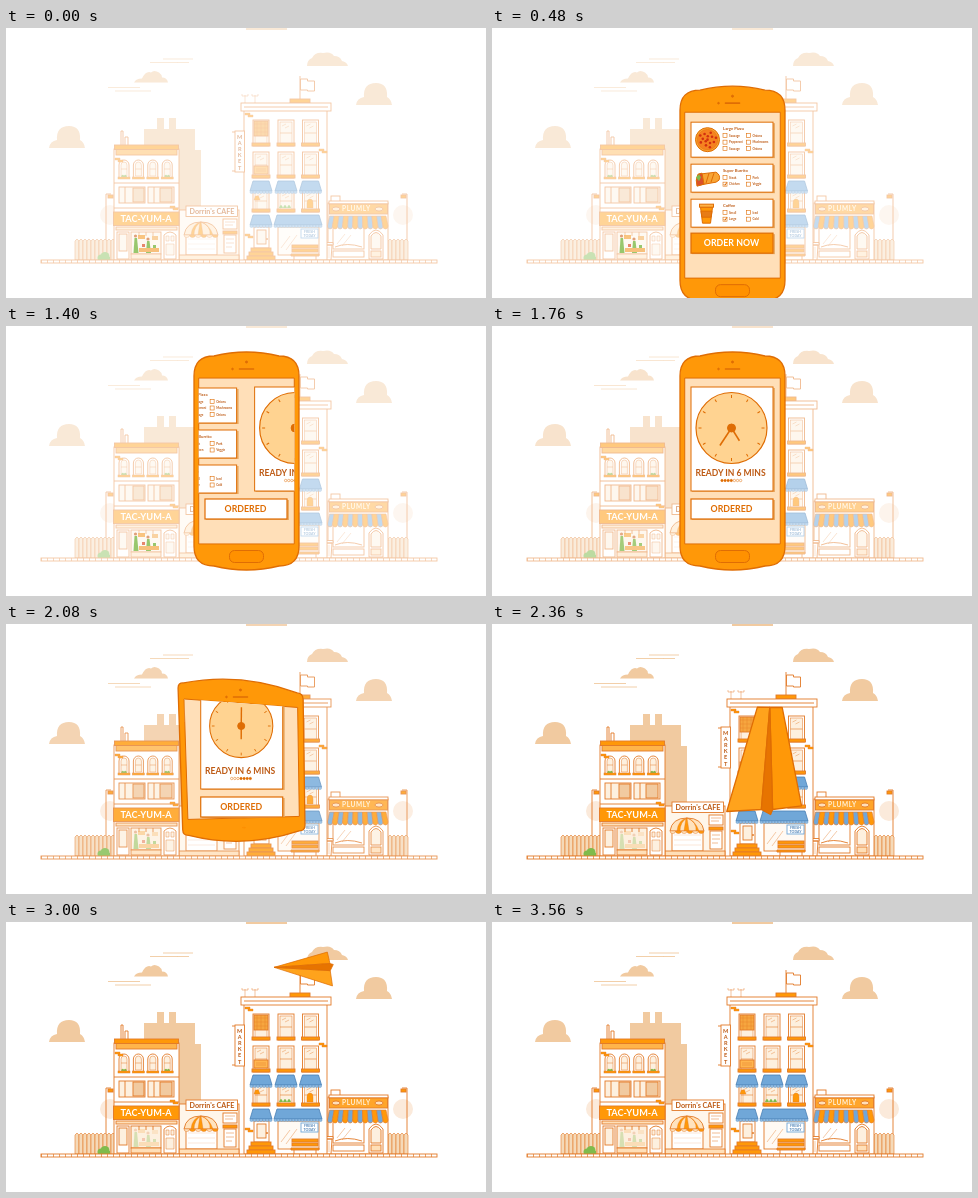
Animation of 480 by 270 pixels, one loop 3600 ms. Source, as an HTML page:

```html
<!DOCTYPE html>
<html lang="en">
<head>
<meta charset="utf-8">
<title>Order ahead</title>
<style>
  html, body { margin: 0; width: 100%; height: 100%; overflow: hidden; background: #fff; }
  svg { display: block; width: 100%; height: 100%; }
  text { font-family: Lato, sans-serif; font-weight: 700; stroke: none; }
</style>
</head>
<body>
<svg id="stage" viewBox="0 0 480 270"></svg>
<script>
const ORANGE = '#ff9808', LINE = '#e27a28', DEEP = '#df6d04', TAN = '#f1caa0', CREAM = '#fdf0df',
  PALE = '#ffdfb8', BLUE = '#70a7d8', NAVY = '#4b80b5', GREEN = '#7fbb4c', INK = '#bd5a14';
const LOOP = 3600;

// ---------- markup helpers ----------
const rect = (x, y, w, h, fill = '#fff', extra = '') =>
  `<rect x="${x}" y="${y}" width="${w}" height="${h}" fill="${fill}" ${extra}/>`;
const path = (d, fill = 'none', extra = '') => `<path d="${d}" fill="${fill}" ${extra}/>`;
const circle = (x, y, r, fill = '#fff', extra = '') =>
  `<circle cx="${x}" cy="${y}" r="${r}" fill="${fill}" ${extra}/>`;
const label = (x, y, size, str, fill = DEEP, extra = 'text-anchor="middle"') =>
  `<text x="${x}" y="${y}" font-size="${size}" fill="${fill}" ${extra}>${str}</text>`;
const group = (inner, attrs = '') => `<g ${attrs}>${inner}</g>`;
const times = (n, fn) => Array.from({ length: n }, (_, i) => fn(i)).join('');
const NOLINE = 'stroke="none"', THIN = 'stroke-width=".4"', HEAVY = 'text-anchor="middle" font-weight="900"';

// ---------- town ----------
const cloud = (x, y, d) => path(d, TAN, `${NOLINE} transform="translate(${x} ${y})"`);
const PUFF = 'M0 22q1-7 8-8q-1-14 12-14q12 0 11 14q4 2 5 8z';

// striped shop awning with a scalloped hem
function awning(x, y, w, h, n, colors) {
  const step = w / n, slant = 2;
  return group(times(n, i => {
    const a = x + i * step, top = j => x + slant + j * (w - 2 * slant) / n;
    return path(`M${top(i)} ${y}H${top(i + 1)}L${a + step} ${y + h - 3}a${step / 2} 3 0 0 1 ${-step} 0Z`,
      colors[i % colors.length]);
  }), 'stroke-width=".6"');
}

// plain window canopy with a narrow valance
function canopy(x, y, w) {
  const n = Math.round(w / 3), step = w / n;
  return group(path(`M${x + 3} ${y}h${w - 6}l3 10h${-w}z`, BLUE) +
    times(n, i => path(`M${x + i * step} ${y + 10}h${step}v1.500a${step / 2} 1 0 0 1 ${-step} 0z`, '#8fbce4', 'stroke-width=".35"')),
    `stroke="${NAVY}" stroke-width=".8"`);
}

function sash(x, y, w, h) {
  return rect(x, y, w, h) + rect(x + 2, y + 2, w - 4, h - 3, CREAM, 'stroke-width=".5"') +
    path(`M${x + 2} ${y + h / 2}h${w - 4}`, 'none', 'stroke-width=".6"') +
    path(`M${x + 4} ${y + 6}l4 -2m-1 4l4 -2`, 'none', THIN) + rect(x - 1, y + h - 3, w + 2, 3, ORANGE);
}

const fence = (x, n) => times(n, i => path(`M${x + i * 4} 232v-19l2-2l2 2v19z`, '#f5d9b8', 'stroke-width=".6"'));

const lamp = (x, side) => circle(x, 187, 10, '#fbeadb', NOLINE) +
  path(`M${x + side * 4} 232V166h${-side * 5}`) + rect(x - 2, 167, 5, 3, ORANGE);

const bricks = (x, y) => path(`M${x} ${y}h5v2h-5zm3 2h5v2h-5z`, ORANGE, THIN);

function skyline() {
  return cloud(43, 98, PUFF) + cloud(350, 55, PUFF) +
    cloud(128, 43, 'M0 11.500q2-4 8-4q4-8 9-6q3-3 8 0q3 2 3 5q5 0 6 5z') +
    cloud(301, 24, 'M0 14q0-6 5-8q3-6 11-5q8-2 11 3q6 0 8 5q5 1 6 5z') +
    rect(240, 0, 41, 2, TAN, NOLINE) +
    path('M157 31h30M144 34.500h28M171 34.500h12M102 59.500h32M109 63h36', 'none', `stroke="${TAN}"`) +
    path('M138 190V101h13V90h7v11h5V90h7v11h19v21h6v68z', TAN, NOLINE);
}

function wrapShop() {
  return path('M115 118v-15h2v15M119 118v-9h3v9') + rect(108, 121, 65, 111) +
    rect(110, 121, 61, 6, '#ffb44a') + rect(108.500, 117, 64, 4.500, ORANGE) +
    times(4, i => {
      const x = 113 + i * 14.4;
      return path(`M${x} 150v-13a5 5 0 0 1 10 0v13z`, '#fff') +
        path(`M${x + 2} 148v-11a3 3 0 0 1 6 0v11zm0-7h6`, CREAM, 'stroke-width=".5"') +
        (i % 3 ? '' : path(`M${x + 2} 149q1.500-4 3-1q1.500-3 3 1z`, GREEN, NOLINE)) + rect(x - 1, 149, 12, 2, ORANGE, 'stroke-width=".5"');
    }) + path('M108 155h65M108 180h65') +
    rect(113, 159, 26, 16, CREAM) + rect(142, 159, 26, 16, CREAM) + rect(127, 160, 11, 14, TAN) + rect(154, 160, 12, 14, TAN) +
    path('M119 159v16M148 159v16') + bricks(109, 130) + bricks(164, 178) +
    rect(107.500, 184, 65.500, 13.500, ORANGE) + label(140, 194, 9.2, 'TAC-YUM-A', '#fff', HEAVY) +
    rect(110, 199, 61, 3, PALE) + rect(111, 204, 12, 27) + rect(113, 206, 8, 17, CREAM) +
    rect(125, 204, 30, 22, CREAM) + path('M133 204v4m7-4v4m7-4v4') +
    rect(125, 226, 30, 5, PALE) + path('M158 231v-24q6-6 12 0v24z', '#fff') +
    path('M160 216h8v11h-8zM160 213v-5h3v5zm5 0v-5h3v5z', CREAM, 'stroke-width=".5"');
}

function cafe() {
  return rect(173, 182, 60, 50, '#fff6ea') + rect(180, 178, 51.500, 10.500) +
    label(206, 186, 7.2, "Dorrin's CAFE", INK, HEAVY) + rect(180, 206, 31, 21) +
    path('M182 211h27m-27 5h27m-27 5h27', 'none', 'stroke-width=".3" opacity=".6"') +
    path('M178 207q2-13 17-13t17 13z', '#ffe3be') +
    path('M185 207q1-11 10-13q-7 4-7 13zM192 207l2-13h1l2 13zM204 207q1-9-9-13q8 2 12 13z', ORANGE, THIN) +
    times(6, i => path(`M${178 + i * 5.67} 207a2.83 2.500 0 0 0 5.67 0z`, i % 2 ? ORANGE : '#ffe3be', 'stroke-width=".5"')) +
    rect(217, 191, 14, 10) + path('M219 194h10m-10 3h8', 'none', 'stroke-width=".5"') +
    rect(217, 203, 14, 3, ORANGE) + rect(218, 207, 12, 18) + path('M220 211h8m-8 4h8m-8 4h6', 'none', 'stroke-width=".5"') +
    rect(173, 227, 60, 5, PALE);
}

function market() {
  const cols = [247, 272, 296.5];
  const antenna = x => path(`M${x} 75v-8m-3-1v2h6v-2`, 'none', 'opacity=".5"');
  return antenna(239) + antenna(249) + path('M294 71V48') + path('M294.500 51h7v2h7v10h-7v-1h-7z', '#fff') +
    rect(284, 71, 20, 4, ORANGE) + rect(238, 82, 83, 150) + rect(235, 75, 90, 8) + path('M238 79h84') +
    cols.map(x => sash(x, 92, 16, 26) + sash(x, 124, 16, 26) + sash(x, 162, 16, 22) + canopy(x - 3, 153, 22)).join('') +
    rect(248, 93, 14, 15, '#f6a63f') + path('M248 96h14m-14 4h14m-14 4h14m-11-11v15m4-15v15m4-15v15', 'none', THIN) +
    rect(248, 138, 14, 8, '#ffb64f') + path('M250 141h10m-10 2h10', 'none', 'stroke-width=".5"') +
    path('M251 181v-9m-3 0h6l-1.500-4h-3z', ORANGE, THIN) +
    path('M273 180q2-6 4 0q2-6 4 0q2-6 4 0', GREEN, NOLINE) +
    path('M301 180v-5a3 4 0 0 1 6 0v5z', ORANGE, THIN) +
    rect(248, 199, 15, 21) + rect(251, 202, 9, 14, CREAM) + circle(261, 211, .6, DEEP) +
    rect(245, 220, 20, 4, ORANGE) + rect(243, 224, 24, 4, ORANGE) + rect(241, 228, 28, 4, ORANGE) +
    rect(272, 199, 41, 28, '#fffaf4') + path('M275 220l9-12m-4 14l11-15', 'none', THIN) +
    rect(295, 201, 17, 9, '#fff', `stroke="${BLUE}"`) + label(303.5, 205, 3.5, 'FRESH', NAVY) + label(303.5, 208.8, 3.5, 'TODAY', NAVY) +
    canopy(244, 187, 22) + canopy(268, 187, 48) +
    bricks(239, 85) + bricks(313, 121) + bricks(239, 206) +
    rect(229, 103, 9.5, 41) + [...'MARKET'].map((c, i) => label(233.7, 110.5 + i * 6.2, 5.6, c, INK, HEAVY)).join('') +
    path('M226 104h3m-3 39h3') +
    rect(286, 217, 26, 3, ORANGE) + rect(286, 221, 26, 3, ORANGE) + path('M285 226h28v2h-28zm3 2v4m22-4v4', ORANGE);
}

function cornerShop() {
  const oval = x => `<ellipse cx="${x}" cy="181" rx="4" ry="2" fill="${PALE}"/>`;
  return rect(325, 168, 9, 6) + rect(322, 175, 60, 57) + rect(323, 173, 59, 3) + rect(323.5, 176, 58, 10, '#ffa52a') +
    label(350.5, 183, 6.5, 'PLUMLY', '#fff0d8', 'text-anchor="middle" letter-spacing=".6"') + oval(330) + oval(373) +
    rect(327, 198, 31, 23) + path('M331 216l8-10m-3 12l9-11', 'none', THIN) + path('M329 219q12-5 27 0') +
    path('M363 231v-24q7-10 14 0v24z', '#fff') + path('M365 221v-13q5-7 10 0v13z', CREAM) + rect(365, 223, 10, 6, PALE) +
    awning(321.5, 188, 60.5, 13, 12, [BLUE, ORANGE]) + rect(327, 223, 31, 6) +
    path('M316 217h10l-1 15h-8zM315 214.500h12v2.500h-12z', '#fff') + path('M319 219v11m2-11v11m2-11v11', 'none', THIN);
}

const bush = circle(95, 230, 3.5, GREEN) + circle(99, 228.5, 4.5, GREEN) + rect(92, 229, 12, 4, GREEN);
const town = skyline() + lamp(104, -1) + lamp(397, 1) + fence(69, 10) + fence(382, 5) + group(bush, NOLINE) +
  cafe() + wrapShop() + cornerShop() + market() +
  rect(35, 232, 396, 3) + path('M35 233.500H431', 'none', 'stroke-width="3" stroke-dasharray=".7 5.300"');

const person = (x, y) => circle(x, y, 1.6, '#d98a5a') + path(`M${x - 2} 225l1-${223 - y}h2.500l1.500 ${223 - y}z`, GREEN);
const staff = person(129.5, 208) + person(142, 211) + rect(132, 207, 7, 4, '#f8b763') + rect(146, 208, 6, 4, '#f8c88c') +
  rect(133, 220, 20, 4, '#f6b25d') + rect(136, 216, 3, 3, '#e26a4a') + rect(147, 217, 3, 3, GREEN);

// ---------- phone ----------
const option = (x, y, name, on) => rect(x, y, 4, 4, '#fff', 'stroke-width=".6"') +
  (on ? path(`M${x + .7} ${y + 2}l1.200 1.200l2-3`) : '') + label(x + 6, y + 3.2, 3, name, INK, '');

const shadowed = (x, y, w, h, fill, extra) => rect(x + 1, y + 1, w + 1, h, '#e9ad68', NOLINE) + rect(x, y, w, h, fill, extra);

function card(y, h, title, names, checked, picture) {
  return shadowed(199, y, 82, h) + label(231, y + 8, 4.2, title, INK, '') +
    names.map((n, i) => option(i % 2 ? 254.5 : 231, y + 11.5 + (i >> 1) * 6.5, n, i === checked)).join('') + picture;
}

const pizza = circle(215.5, 79.5, 12, '#f8a434') + circle(215.5, 79.5, 10.3, '#f58220', 'stroke-width=".4"') +
  times(14, i => {
    const a = i * 2.4, r = 2.4 * Math.sqrt(i);
    return circle(215.5 + r * Math.cos(a), 79.5 + r * Math.sin(a), 1.3, '#d2300f', NOLINE);
  });
const burrito = path('M207 114l17-2q5 3 3 8l-3 2l-17 3q-4-6 0-11z', '#f8a434') + path('M210 113l2 11l-7 2q-2-6 1-12z', '#d9502a') +
  path('M204 117l3-3l2 3l-2 4z', GREEN, NOLINE) + path('M217 113l-3 10m8-10l-3 9');
const cup = path('M208.500 147h12l-2 16h-8z', ORANGE) + rect(207.5, 144, 14, 3, '#ffb347') + path('M209 151h11l-1 6h-9z', '#e77c16');

const list = card(62, 35, 'Large Pizza', ['Sausage', 'Onions', 'Pepperoni', 'Mushrooms', 'Sausage', 'Onions'], -1, pizza) +
  card(104, 28, 'Super Burrito', ['Steak', 'Pork', 'Chicken', 'Veggie'], 2, burrito) +
  card(139, 28, 'Coffee', ['Small', 'Iced', 'Large', 'Cold'], 2, cup);

const clock = circle(0, 0, 35.5, '#ffd391', 'stroke-width="1.2"') +
  times(12, i => path('M0-33v3', 'none', `transform="rotate(${i * 30})"`)) +
  path('M0 0V-15', 'none', 'id="hour" stroke-width="1.600"') + path('M0 0V-21', 'none', 'id="minute" stroke-width="1.600"') +
  circle(0, 0, 4, DEEP);

const ready = shadowed(199, 61, 82, 104) + group(clock, 'id="clock"') + label(238.5, 150, 8.6, 'READY IN 6 MINS', INK) +
  group(times(7, i => circle(230 + i * 3.1, 154.5, 1.2, DEEP, 'stroke-width=".5"')), 'id="dots"');

const button = shadowed(199, 173, 82, 20, ORANGE, 'id="buttonFace" stroke-width="1.200"') +
  label(239.5, 186.2, 8.8, 'ORDER NOW', '#fff', 'id="buttonText" text-anchor="middle"');

const el = new Proxy({}, { get: (_, id) => document.getElementById(id) });
el.stage.innerHTML = `<defs><clipPath id="clip"><path id="clipShape"/></clipPath></defs>` +
  group(town, `id="town" stroke="${LINE}" stroke-width=".9"`) + group(staff, `id="staff" ${NOLINE}`) +
  group(path('', ORANGE, 'id="body" stroke-width="1.300"') + path('', PALE, 'id="screen"') +
    group(group(group(list, 'id="list"') + group(ready, 'id="ready"') + button, 'id="content"'), 'clip-path="url(#clip)"') +
    group(circle(0, 10, 1, DEEP) + path('M-7 17h14', 'none', 'stroke-width="1.600" stroke-linecap="round"') + circle(-14, 17, .8, DEEP), 'id="top"') +
    rect(-17, -6, 34, 12, '#ff9100', 'rx="5" id="home"'), `id="phone" stroke="${DEEP}"`) +
  group(path('', '#ffa31c', 'id="leftWing"') + path('', ORANGE, 'id="rightWing"') + path('', '#e77400', 'id="keel"'),
    `id="plane" stroke="${DEEP}" stroke-linejoin="round"`);

// ---------- motion ----------
const progress = (t, a, b) => Math.min(1, Math.max(0, (t - a) / (b - a)));
const smooth = p => p * p * (3 - 2 * p);
const mix = (a, b, u) => a.map((v, i) => v + (b[i] - v) * u);
const toward = (a, b, dist) => mix(a, b, dist / Math.hypot(b[0] - a[0], b[1] - a[1]));
const poly = (...pts) => ({ d: `M${pts.join('L')}Z` });
const set = (node, attrs) => Object.entries(attrs).forEach(([k, v]) => node.setAttribute(k, v));

// Catmull-Rom through rows of [time, ...values]
function track(keys, t) {
  const last = keys.length - 1;
  let i = 0;
  while (i < last - 1 && t >= keys[i + 1][0]) i++;
  const at = j => keys[Math.min(last, Math.max(0, j))];
  const u = progress(t, keys[i][0], keys[i + 1][0]);
  return keys[i].slice(1).map((b, n) => {
    const a = at(i - 1)[n + 1], c = at(i + 1)[n + 1], d = at(i + 2)[n + 1];
    return b + .5 * u * (c - a + u * (2 * a - 5 * b + 4 * c - d + u * (3 * (b - c) + d - a)));
  });
}

// time, four corners clockwise from top left, bulge of top and bottom, corner radius
const SQUASH = [[1800, 188, 30, 293, 30, 293, 240, 188, 240, 8, 20], [1960, 189, 21, 292, 21, 292, 250, 189, 250, 9, 18],
  [2080, 172, 58, 297, 69, 299, 207, 177, 212, 16, 6], [2160, 172, 94, 300, 96, 300, 196, 172, 196, 4, 2]];
// time, x, y, scale, turn
const FLIGHT = [[2160, 236, 145, 1, 0], [2440, 300, 130, 1, 0], [2600, 354, 90, 1, 0], [2720, 382, 72, .88, -8], [2840, 398, 66, .7, -50],
  [3000, 300, 48, .55, -92], [3120, 150, 62, .4, -108], [3220, 66, 92, .3, -150], [3320, 82, 130, .24, -200], [3440, 105, 178, .17, -215], [3560, 130, 211, .06, -230]];
// tip twice, right, spine right, keel, spine left, left
const FOLDED = [[7, -56], [7, -56], [31, 42], [10, 46], [8, 52], [-3, 46], [-31, 49]];
const SHEET = [[172, 94], [300, 96], [300, 196], [238, 198], [236, 199], [234, 198], [172, 196]];

function drawPhone(t) {
  const v = track(SQUASH, t), [bulge, radius] = v.slice(8);
  const [tl, tr, br, bl] = [0, 2, 4, 6].map(i => v.slice(i, i + 2));
  const at = (x, y) => mix(mix(tl, tr, x), mix(bl, br, x), y);
  const shifted = (p, dy) => [p[0], p[1] + dy];
  const head = shifted(at(.5, 0), -bulge / 2), foot = shifted(at(.5, 1), bulge / 2);
  const rise = 260 * (1 - progress(t, 105, 685)) ** 2;

  set(el.phone, { transform: `translate(0 ${rise})`, visibility: t >= 80 && t < 2160 ? 'visible' : 'hidden' });
  set(el.body, { d: `M${toward(tl, bl, radius)}Q${tl} ${toward(tl, tr, radius)}Q${shifted(at(.5, 0), -bulge)} ${toward(tr, tl, radius)}
    Q${tr} ${toward(tr, br, radius)}L${toward(br, tr, radius)}Q${br} ${toward(br, bl, radius)}
    Q${shifted(at(.5, 1), bulge)} ${toward(bl, br, radius)}Q${bl} ${toward(bl, tl, radius)}Z` });
  const screen = poly(at(.045, .105), at(.955, .105), at(.955, .895), at(.045, .895));
  set(el.screen, screen);
  set(el.clipShape, screen);
  set(el.content, { transform: `translate(${at(.5, .5)[0] - 240.5} 0)` });
  set(el.top, { transform: `translate(${head})` });
  set(el.home, { transform: `translate(${shifted(foot, -13.5)}) scale(${1 - .92 * progress(t, 1880, 2080)})` });

  const swap = 100 * smooth(progress(t, 1200, 1600));
  set(el.list, { transform: `translate(${-swap} 0)` });
  set(el.ready, { transform: `translate(${100 - swap} 0)` });
  const ordered = t >= 1200;
  set(el.buttonFace, { fill: ordered ? '#fff' : t > 1100 ? '#ed7f00' : ORANGE });
  set(el.buttonText, { fill: ordered ? DEEP : '#fff' });
  el.buttonText.textContent = ordered ? 'ORDERED' : 'ORDER NOW';

  const tick = t - 1760;
  set(el.clock, { transform: `translate(239.5 102) scale(${1 - .11 * progress(t, 1880, 2080)})` });
  set(el.minute, { transform: `rotate(${213 + tick * .46})` });
  set(el.hour, { transform: `rotate(${148 + tick * .1})` });
  const shift = Math.floor(tick / 100);
  [...el.dots.children].forEach((dot, i) => set(dot, { fill: ((i - shift) % 7 + 7) % 7 < 4 ? DEEP : '#fff' }));
}

function drawPlane(t) {
  const [x, y, scale, turn] = track(FLIGHT, t);
  const fold = smooth(progress(t, 2160, 2440)), a = turn * Math.PI / 180;
  const [tl, tr, right, sr, keel, sl, left] = FOLDED.map(([px, py], i) => mix(SHEET[i], [
    x + scale * (px * Math.cos(a) - py * Math.sin(a)),
    y + scale * (px * Math.sin(a) + py * Math.cos(a))], fold));
  const mid = mix(tl, tr, .5);
  set(el.plane, { visibility: t >= 2160 && t < 3560 ? 'visible' : 'hidden', 'stroke-width': Math.max(.4, 1.3 * scale) });
  set(el.leftWing, poly(tl, mid, sl, left));
  set(el.rightWing, poly(mid, tr, right, sr));
  set(el.keel, poly(mid, sr, keel, sl));
}

function render(now) {
  const t = now % LOOP;
  const bright = progress(t, 1640, 2320);
  set(el.town, { opacity: .42 + .58 * bright });
  set(el.staff, { opacity: .8 - .5 * bright });
  drawPhone(t);
  drawPlane(t);
}

const start = performance.now();
function loop() {
  render(performance.now() - start);
  requestAnimationFrame(loop);
}
loop();
</script>
</body>
</html>
```
